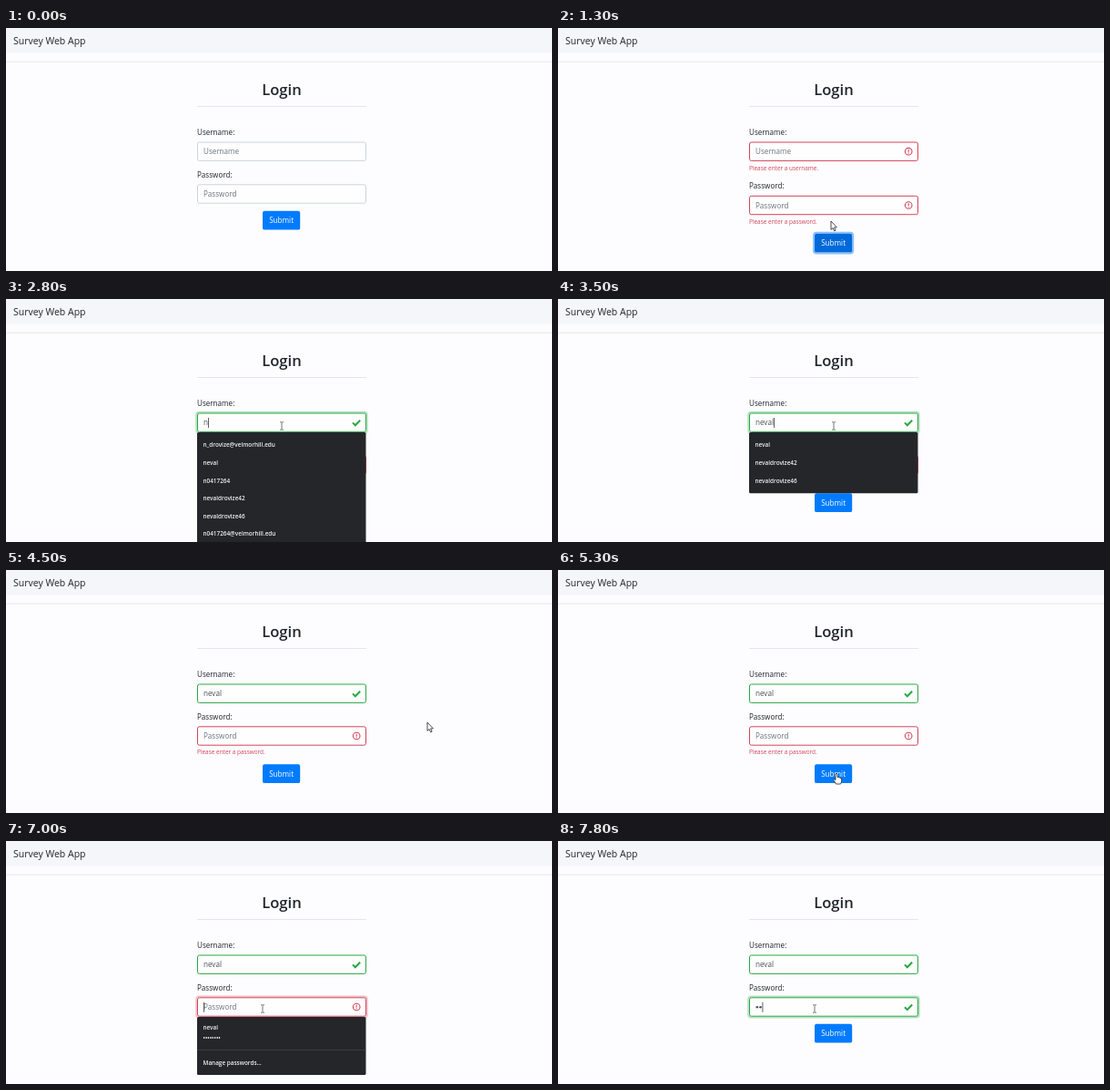
Animation, 600 px wide and 268 px high, one loop 8 s. Source, as an HTML page:

```html
<!DOCTYPE html>
<html lang="en">
<head>
<meta charset="utf-8">
<title>Survey Web App</title>
<style>
  html, body { margin: 0; width: 100%; height: 100%; overflow: hidden; background: #fdfcfe; }
  svg { display: block; width: 100%; height: 100%; }
  text { font-family: "Open Sans", "Noto Sans", sans-serif; white-space: pre; }
</style>
</head>
<body>
<svg id="stage" viewBox="0 0 600 268"></svg>
<script>
const LOOP = 8000, STEP = 100;
const RED = '#d2455b', GREEN = '#28a745', INK = '#212529';
const FIELD = { x: 210.5, w: 185, h: 20.4 };
const ERROR_H = 12.5;
const USER = 'neval';
const LOGINS = ['n_drovize@velmorhill.edu', USER, 'n0417264',
  USER + 'drovize42', USER + 'drovize46', 'n0417264@velmorhill.edu'];
const USER_KEYS = [2800, 2900, 3000, 3100, 3300];
const PASS_KEYS = [7500, 7800];
// time, x, y of the pointer's hot spot
const PATH = [[100, 304, 209], [500, 300, 213], [1300, 300, 213], [2100, 303, 140],
  [3600, 303, 140], [4000, 463, 168], [4500, 463, 168], [5300, 306, 224],
  [5700, 306, 224], [6200, 277, 197], [6500, 282, 185]];

const stage = document.getElementById('stage');
const ctx = document.createElement('canvas').getContext('2d');
const clamp = v => Math.max(0, Math.min(1, v));
const within = (t, a, b) => t >= a && t < b;
const countKeys = (keys, t) => keys.filter(k => k <= t).length;

function textWidth(s, size) {
  ctx.font = `${size * 10}px "Open Sans", "Noto Sans", sans-serif`;
  return ctx.measureText(s).width / 10;
}
const text = (s, x, y, size, fill = INK, extra = '') =>
  `<text x="${x}" y="${y}" font-size="${size}" fill="${fill}" ${extra}>${s}</text>`;
const rect = (x, y, w, h, fill, extra = '') =>
  `<rect x="${x}" y="${y}" width="${w}" height="${h}" fill="${fill}" ${extra}/>`;
const path = (d, extra) => `<path d="${d}" ${extra}/>`;
const ring = (x, y, w, h, color, alpha) =>
  rect(x - 1.3, y - 1.3, w + 2.6, h + 2.6, 'none',
    `rx="3" stroke="${color}" stroke-width="1.9" stroke-opacity="${alpha}"`);

function pointerAt(t) {
  if (t < PATH[0][0]) return null;
  for (let i = 1; i < PATH.length; i++) {
    const [t0, x0, y0] = PATH[i - 1], [t1, x1, y1] = PATH[i];
    if (t < t1) {
      const k = clamp((t - t0) / (t1 - t0)), e = k * k * (3 - 2 * k);
      return { x: x0 + (x1 - x0) * e, y: y0 + (y1 - y0) * e };
    }
  }
  const [, x, y] = PATH[PATH.length - 1];
  return { x, y };
}

function statusIcon(status, y) {
  if (status === 'valid')
    return path(`M381 ${y + .2}l2.8 2.9 5.4-5.6`, `fill="none" stroke="${GREEN}" stroke-width="2"`);
  if (status === 'invalid')
    return `<circle cx="385.2" cy="${y}" r="3.8" fill="none" stroke="${RED}" stroke-width="1.1"/>` +
      path(`M385.2 ${y - 2.2}v2.7M385.2 ${y + 1.3}v1`, `stroke="${RED}" stroke-width="1.1"`);
  return '';
}

function field(f) {
  const color = { valid: GREEN, invalid: RED }[f.status] || '#ced4da';
  const base = f.y + 13.4;
  let out = text(f.label + ':', 210, f.y - 8, 8.1);
  if (f.focus) out += ring(FIELD.x, f.y, FIELD.w, FIELD.h, color, .32);
  out += rect(FIELD.x, f.y, FIELD.w, FIELD.h, '#fefefe', `rx="2" stroke="${color}"`);
  let end = 217;
  if (f.dots) {
    for (let i = 0; i < f.dots; i++)
      out += `<circle cx="${218.8 + i * 3.7}" cy="${f.y + 10.4}" r="1.25" fill="#495057"/>`;
    end += f.dots * 3.7;
  } else if (f.value) {
    out += text(f.value, 217, base, 8.1, '#495057');
    end += textWidth(f.value, 8.1);
  } else out += text(f.label, 217, base, 8.1, '#6c757d');
  if (f.focus && (f.t - f.since) % 1000 < 500)
    out += rect(end + .1, f.y + 5, .8, 11, '#343a40');
  out += statusIcon(f.status, f.y + 10.2);
  if (f.status === 'invalid')
    out += text(`Please enter a ${f.label.toLowerCase()}.`, 210, f.y + 30.6, 6.45, RED);
  return out;
}

function button(y, hover, focus) {
  const mix = (a, b) => Math.round(a + (b - a) * hover);
  const fill = `rgb(0,${mix(123, 105)},${mix(255, 217)})`;
  return (focus ? ring(282.3, y + .3, 40.6, 20.2, '#268fff', .55) : '') +
    rect(282, y, 41.2, 20.8, fill, 'rx="2.2"') +
    text('Submit', 302.6, y + 13.4, 8.15, '#fff', 'text-anchor="middle"');
}

const panel = (y, h) => rect(210, y, 185.5, h, '#24262a', 'rx="1.5"');
const item = (s, y) => text(s, 216.5, y, 6.4, '#f1f2f4', 'font-weight="600"');

function loginList(typed) {
  const found = LOGINS.filter(s => s.startsWith(typed));
  return panel(147, 8.4 + found.length * 19.6) +
    found.map((s, i) => item(s, 163.3 + i * 19.6)).join('');
}

function passwordList(alpha) {
  return `<g opacity="${alpha}">` + panel(194, 64) + item(USER, 208) + item('••••••••', 220) +
    rect(210, 230, 185.5, .6, '#4a4c50') + item('Manage passwords…', 246.5) + '</g>';
}

function cursor(p, kind) {
  const ink = 'stroke="#222" stroke-width=".8" stroke-linejoin="round" fill="#fff"';
  const shape = {
    arrow: path('M0 0V9.4L2.1 7.5 3.6 10.9 5.1 10.2 3.6 6.9H6.4Z', ink),
    hand: path('M-1 6V1Q0-.8 1 1V4.5Q2.2 3.8 2.7 5 3.9 4.5 4.2 5.6 5.6 5.2 5.6 6.8V8.5' +
      'Q5.6 10 4.6 12H-.6Q-1.4 10-3.4 7.6-3.4 6-2 6.8L-1 7.6Z', ink),
    beam: path('M-2-4.2H-.6L0-3.7.6-4.2H2M0-3.7V3.7M-2 4.2H-.6L0 3.7.6 4.2H2',
      'fill="none" stroke="#555" stroke-width=".8"')
  }[kind];
  return `<g transform="translate(${p.x} ${p.y})">${shape}</g>`;
}

function draw(t) {
  const typed = USER.slice(0, countKeys(USER_KEYS, t));
  const dots = countKeys(PASS_KEYS, t);
  const status = filled => t < 1300 ? '' : filled ? 'valid' : 'invalid';
  const lastKey = (keys, start) => keys.filter(k => k <= t).pop() || start;

  const user = { label: 'Username', y: 126, t, value: typed, status: status(typed),
    focus: within(t, 2500, 4500), since: lastKey(USER_KEYS, 2500) };
  const passY = 172.8 + (user.status === 'invalid' ? ERROR_H : 0);
  const pass = { label: 'Password', y: passY, t, dots, status: status(dots),
    focus: t >= 6800, since: lastKey(PASS_KEYS, 6800) };
  const buttonY = passY + 29 + (pass.status === 'invalid' ? ERROR_H : 0);
  const focus = within(t, 1000, 2500) || within(t, 5700, 6800);
  const hover = focus ? 1 : within(t, 100, 1300) ? clamp((t - 100) / 150)
    : within(t, 5300, 5700) ? clamp((t - 5300) / 150) : 0;

  let out = rect(0, 0, 600, 268, '#fdfcfe') + rect(0, 0, 600, 27.5, '#f5f6fa') +
    rect(0, 36.7, 600, .9, '#e4e4e8') + rect(210, 86, 186, .9, '#e4e4e8') +
    text('Survey Web App', 8, 17.6, 10.5) +
    text('Login', 303, 74.3, 16.6, INK, 'font-weight="600" text-anchor="middle"') +
    field(user) + field(pass) + button(buttonY, hover, focus);

  const listOpen = typed && user.focus;
  if (listOpen) out += loginList(typed);
  if (within(t, 6900, 7500)) out += passwordList(clamp((t - 6800) / 150));

  const p = pointerAt(t);
  if (p) {
    const over = (x, y, w, h) => p.x >= x && p.x <= x + w && p.y >= y && p.y <= y + h;
    const overField = y => over(FIELD.x, y, FIELD.w, FIELD.h);
    const kind = overField(user.y) || (!listOpen && overField(passY)) ? 'beam'
      : !listOpen && over(282, buttonY, 41, 21) ? 'hand' : 'arrow';
    out += cursor(p, kind);
  }
  stage.innerHTML = out;
}

const start = performance.now();
let shown = -1;
function tick() {
  const t = Math.floor((performance.now() - start) % LOOP / STEP) * STEP;
  if (t !== shown) draw(shown = t);
  requestAnimationFrame(tick);
}
draw(0);
tick();
</script>
</body>
</html>
```
